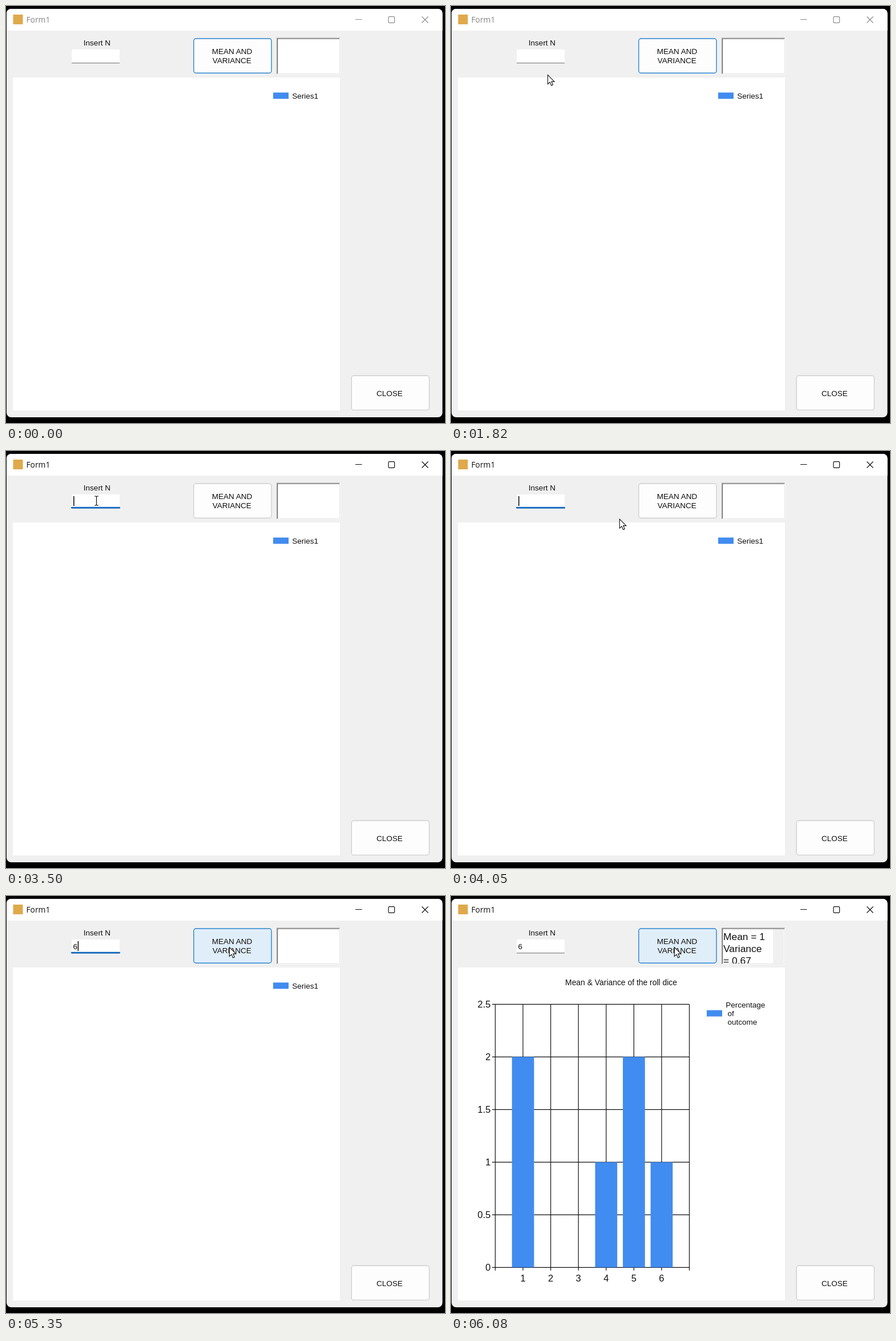
Recreate the animation shown at these times as an HTML page. Size 769 px wide and 729 px high, loop 8 s.

```html
<!DOCTYPE html>
<html lang="en">
<head>
<meta charset="utf-8">
<title>Form1</title>
<style>
  html, body { margin: 0; width: 100%; height: 100%; overflow: hidden; background: #000; }
  svg { display: block; width: 769px; height: 729px; }
  text { font: 13.5px "Liberation Sans", Arial, sans-serif; fill: #111; white-space: pre; }
  .mid { text-anchor: middle; }
  .end { text-anchor: end; }
  .title { font: 13.8px "Open Sans", "Noto Sans", sans-serif; }
  .head { font-size: 13.9px; }
  .axis { font-size: 16.5px; }
  .rich { font-size: 17.4px; }
  .btn { fill: #fdfdfd; stroke: #d0d0d0; stroke-width: 1.4; }
  .line { fill: none; stroke: #111; stroke-width: 1.2; }
</style>
</head>
<body>
<svg viewBox="0 0 769 729">
  <defs>
    <clipPath id="richClip"><rect x="476" y="58" width="107" height="60"/></clipPath>
  </defs>
  <rect width="769" height="729"/>
  <rect x="1" y="5" width="763.5" height="714" rx="8" fill="#f0f0f0"/>
  <path d="M1 43V13a8 8 0 0 1 8-8H756.5a8 8 0 0 1 8 8V43Z" fill="#fff"/>
  <rect x="12.5" y="15" width="17" height="17" fill="#dfa94c"/>
  <text id="title" class="title" x="35.5" y="28.5">Form1</text>
  <g id="controls" fill="none" stroke-width="1.2">
    <path d="M612 23.5H623.5M728.5 18.5L739.5 29.5M739.5 18.5L728.5 29.5"/>
    <rect x="670" y="18.7" width="10.6" height="10.6" rx="1.6"/>
  </g>

  <text class="mid" x="159.5" y="69">Insert N</text>
  <rect x="115" y="76" width="84" height="24" rx="1.5" fill="#fff"/>
  <rect x="115" y="99" width="84" height="1.3" fill="#8c8c8c"/>
  <rect id="underline" x="114" y="97.8" width="86" height="2.6" rx="1" fill="#1067c0"/>
  <text id="entry" x="117.5" y="92.5">6</text>
  <rect id="caret" y="79" width="1.6" height="17" fill="#111"/>

  <rect id="mean" class="btn" x="328.8" y="57" width="136.2" height="60.3" rx="4"/>
  <text class="mid" x="396" y="84">MEAN AND</text>
  <text class="mid" x="395.7" y="100">VARIANCE</text>
  <rect class="btn" x="605.2" y="646.2" width="136.2" height="60.2" rx="4"/>
  <text class="mid" x="672" y="682">CLOSE</text>

  <rect x="474" y="55.5" width="111.5" height="64" fill="#fff"/>
  <path d="M474.5 119V56H585" fill="none" stroke="#a5a5a5" stroke-width="1.2"/>
  <path d="M475.6 118V57.1H584" fill="none" stroke="#747070" stroke-width="1.2"/>
  <path d="M476 118.3H584.3V58" fill="none" stroke="#e3e3e3"/>
  <g id="result" clip-path="url(#richClip)">
    <rect x="564" y="58" width="20" height="60" fill="#f0f0f0"/>
    <text class="rich" x="477" y="76.6">Mean = 1</text>
    <text class="rich" x="477" y="97.6">Variance</text>
    <text class="rich" x="477" y="118.6">= 0.67</text>
  </g>

  <rect x="12" y="125" width="573" height="582" fill="#fff"/>
  <g id="empty">
    <rect x="468" y="151.3" width="27" height="11" fill="#418cf0"/>
    <text x="501.2" y="162">Series1</text>
  </g>
  <g id="chart">
    <text class="head mid" x="298" y="156">Mean &amp; Variance of the roll dice</text>
    <rect x="448" y="199.6" width="27" height="11" fill="#418cf0"/>
    <text x="481.2" y="195">Percentage</text>
    <text x="484.6" y="210">of</text>
    <text x="484.6" y="224.5">outcome</text>
  </g>

  <path id="beam" class="line" d="M-3.5 -8H-1L0 -7L1 -8H3.5M0 -7V7M-3.5 8H-1L0 7L1 8H3.5"/>
  <path id="arrow" d="M0 0V16L3.8 12.6L6.3 18.5L9 17.3L6.5 11.6H11.6Z" fill="#fff" stroke="#111" stroke-width="1.1"/>
</svg>
<script>
const LOOP = 8000, STEP = 70;
const $ = id => document.getElementById(id);

function add(parent, tag, attrs, text) {
  const el = document.createElementNS("http://www.w3.org/2000/svg", tag);
  for (const k in attrs) el.setAttribute(k, attrs[k]);
  if (text !== undefined) el.textContent = text;
  parent.append(el);
}

function buildChart() {
  const g = $("chart"), left = 77.5, right = 417.5, top = 189.3, base = 649.3;
  const px = v => left + v * (right - left) / 7;
  const py = v => base - v * (base - top) / 2.5;
  let grid = "";
  for (let i = 0; i <= 7; i++) grid += `M${px(i)} ${top}V${base + 5.5}`;
  for (let v = 0; v <= 2.5; v += 0.5) {
    grid += `M${left - 5.5} ${py(v)}H${right}`;
    add(g, "text", { class: "axis end", x: 69.5, y: py(v) + 5.7 }, v);
  }
  add(g, "path", { class: "line", d: grid });
  [2, 0, 0, 1, 2, 1].forEach((n, i) => {
    const x = px(i + 1);
    if (n) add(g, "rect", { x: x - 19.3, y: py(n), width: 38.7, height: base - py(n), fill: "#418cf0" });
    add(g, "text", { class: "axis mid", x, y: 674 }, i + 1);
  });
}

// Pointer moves as rows of [time, x, y]
const moves = [
  [[1120, 111, 722], [1190, 122, 701], [1330, 138, 580], [1540, 170, 310], [1680, 186, 172],
   [1750, 179, 138], [1820, 169.5, 120.5], [1890, 166, 105], [1960, 162, 93], [2170, 158.5, 87], [2430, 158.5, 87]],
  [[3770, 162, 89], [3840, 183, 98], [3910, 214, 105], [3980, 248, 110], [4050, 295.3, 119]],
  [[4580, 297, 118], [4650, 312, 112], [4720, 335, 103], [4860, 365, 94], [5000, 386, 90], [5140, 391.3, 89.5]]
];

function pointer(t) {
  const keys = moves.findLast(m => t >= m[0][0]);
  if (!keys || (t >= 4320 && t < 4580)) return null;
  const start = keys[0][0], last = keys[keys.length - 1];
  if (t >= last[0]) return last.slice(1);
  const q = start + Math.floor((t - start) / STEP) * STEP;
  const i = keys.findIndex(k => k[0] > q);
  const a = keys[i - 1], b = keys[i], f = (q - a[0]) / (b[0] - a[0]);
  return [a[1] + (b[1] - a[1]) * f, a[2] + (b[2] - a[2]) * f];
}

const within = (t, a, b) => t >= a && t < b;
const show = (id, on) => $(id).setAttribute("visibility", on ? "visible" : "hidden");
const paint = (id, attrs) => { for (const k in attrs) $(id).setAttribute(k, attrs[k]); };

function render(t) {
  const active = t >= 2360, typed = t >= 4250;
  const p = pointer(t);
  const inBox = p && p[0] > 115 && p[0] < 199 && p[1] > 76 && p[1] < 100;
  const hover = p && p[0] > 328 && p[0] < 465 && p[1] > 57 && p[1] < 117;

  $("title").style.fill = active ? "#111" : "#858585";
  paint("controls", { stroke: active ? "#111" : "#8c8c8c" });

  const blue = hover || !active;
  $("mean").style.fill = within(t, 5820, 5880) ? "#cce4f7" : hover ? "#e0eef9" : "#fdfdfd";
  $("mean").style.stroke = blue ? "#2b84d0" : "#d0d0d0";

  paint("underline", { opacity: !active || t >= 6010 ? 0 : t >= 5950 ? 0.4 : t >= 5880 ? 0.85 : 1 });
  show("entry", typed);
  paint("caret", { x: typed ? 125.6 : 118 });
  show("caret", within(t, 2430, 2970) || within(t, 3500, 4780) || within(t, 5350, 5820));

  show("result", t >= 5880);
  show("empty", t < 5950);
  show("chart", t >= 5950);

  show("beam", inBox);
  show("arrow", p && !inBox);
  if (p) paint(inBox ? "beam" : "arrow", { transform: `translate(${p[0]} ${p[1]})` });
}

buildChart();
const began = performance.now();
function frame() {
  render((performance.now() - began) % LOOP);
  requestAnimationFrame(frame);
}
frame();
</script>
</body>
</html>
```
